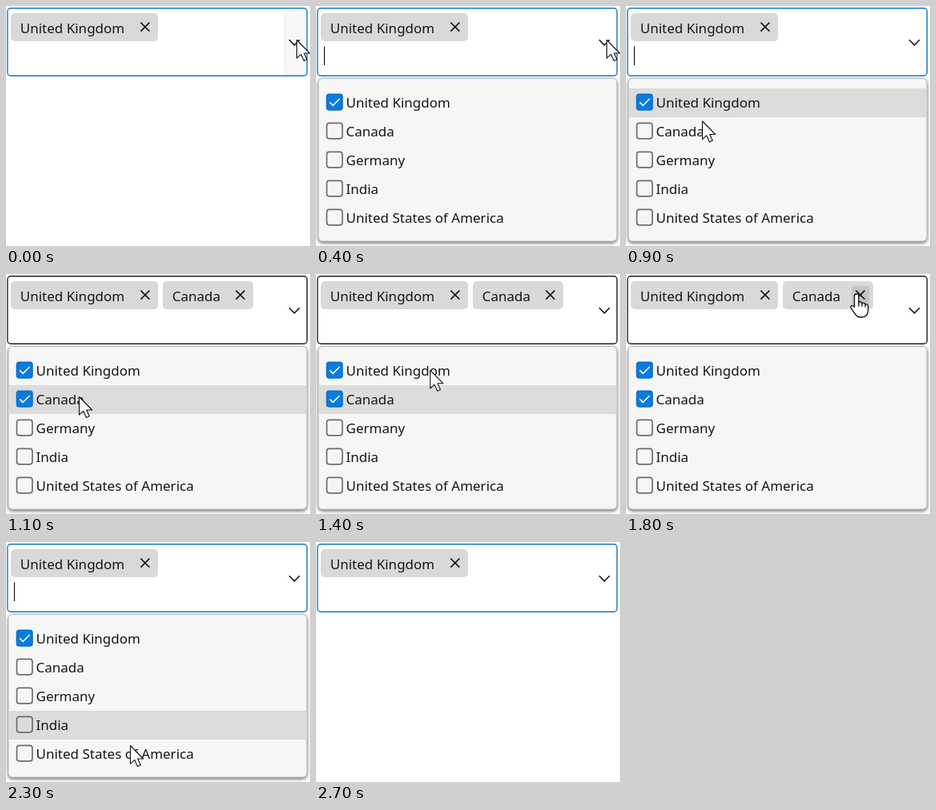
An HTML page that plays this animation: 380 by 300 pixels, repeating every 2800 ms.

```html
<!DOCTYPE html>
<html lang="en">
<head>
<meta charset="utf-8">
<title>Multi-select combo box</title>
<style>
  html, body { margin: 0; width: 100%; height: 100%; overflow: hidden; background: #fff; }
  svg { display: block; width: 380px; height: 300px; }
  text { font: 17px "Noto Sans", "Open Sans", sans-serif; fill: #161616; }
  .line { fill: none; stroke: #161616; stroke-width: 1.6; }
  .pointer { fill: #fff; stroke: #111; stroke-width: 1.1; stroke-linejoin: round; }
</style>
</head>
<body>
<svg id="stage" viewBox="0 0 380 300" xmlns="http://www.w3.org/2000/svg">
  <defs>
    <filter id="shade" x="-5%" y="-5%" width="110%" height="115%">
      <feDropShadow dx="0" dy="1.8" stdDeviation="2.2" flood-color="#000" flood-opacity=".62"/>
    </filter>
  </defs>
  <rect width="380" height="300" fill="#fff"/>
  <g id="popup">
    <rect x="3" y="90.5" width="373" height="203.5" rx="5" fill="#f6f6f6" stroke="#a8a8a8" stroke-width=".8" filter="url(#shade)"/>
    <rect id="rowHover" x="4" width="372" height="36" fill="#dcdcdc"/>
    <g id="rows"></g>
  </g>
  <rect x="2" y="3" width="374" height="84" rx="4" fill="#fff"/>
  <rect id="dropHover" x="347" y="4" width="28" height="82" fill="#f7f7f7"/>
  <rect id="field" x="1.9" y="2.8" width="374.4" height="84.5" rx="4" fill="none" stroke-width="1.4"/>
  <g id="chips"></g>
  <path id="caret" d="M10.5 50.5V74" stroke="#111" stroke-width="1.2"/>
  <path id="chevron" class="line" d="M354 42.3L360.5 48.8L367 42.3"/>
  <path id="arrow" class="pointer" d="M.5 .5V23.2L5.7 18.3L9.4 26.5L13.2 24.8L9.6 17H16.6Z"/>
  <g id="hand">
    <g class="pointer" transform="translate(-.8 0) scale(1.22)">
      <path d="M-2.2 2Q-2.2 0 0 0Q2.2 0 2.2 2V9Q2.4 7.8 4 8Q5.5 8.1 5.6 9.8Q6 8.9 7.4 9.1Q8.8 9.3 8.9 10.8Q9.4 10.2 10.5 10.5Q11.8 11 11.8 12.5V17Q11.8 23.8 4.5 23.8Q.6 23.8 -1.4 20.6L-5.6 14.6Q-6.4 13 -5.2 12Q-4 11.3 -2.2 13.4Z"/>
      <path d="M2.2 9V13M5.6 9.8V13M8.9 10.8V13.5" fill="none"/>
    </g>
  </g>
</svg>
<script>
const LOOP = 2800, STEP = 100, ROW_TOP = 103, ROW_H = 36;
const OPEN = 400, CLOSE = 2700, PICK = 1100, DROP = 1900, LEAVE = 2500;
const countries = ["United Kingdom", "Canada", "Germany", "India", "United States of America"];

// Pointer stops: time, x, y
const path = [
  [0, 363, 42], [400, 363, 42], [800, 99, 134], [1000, 91, 153], [1200, 91, 153],
  [1800, 289, 25], [1900, 289, 25], [2200, 158, 245], [2300, 155, 254], [2400, 358, 41]
];

const $ = id => document.getElementById(id);
const show = (el, on) => el.setAttribute("display", on ? "inline" : "none");

function make(parent, tag, attrs, text = "") {
  const el = document.createElementNS("http://www.w3.org/2000/svg", tag);
  for (const key in attrs) el.setAttribute(key, attrs[key]);
  el.textContent = text;
  return parent.appendChild(el);
}

function addChip(x, width, label) {
  const g = make($("chips"), "g", { transform: `translate(${x} 9)` });
  make(g, "rect", { width, height: 35, rx: 5, fill: "#d9d9d9" });
  const hover = make(g, "rect", { x: width - 27, y: 6, width: 22, height: 23, rx: 2, fill: "#c5c5c5" });
  make(g, "text", { x: 11.8, y: 25 }, label);
  make(g, "path", { class: "line", d: `M${width - 21.6} 11.6l11 11m0 -11l-11 11` });
  return { g, hover };
}

function addRow(label, i) {
  const y = 120 + i * ROW_H;
  const box = make($("rows"), "rect", { x: 13.5, y: y - 9.6, width: 19.4, height: 19.4, rx: 3, "stroke-width": 1.7 });
  const tick = make($("rows"), "path", {
    d: `M17.2 ${y + .4}l4 4l8.4 -8.4`, fill: "none", stroke: "#fff", "stroke-width": 1.5
  });
  make($("rows"), "text", { x: 37.5, y: y + 7 }, label);
  return on => {
    show(tick, on);
    box.setAttribute("fill", on ? "#0a7be0" : "none");
    box.setAttribute("stroke", on ? "#0a70cc" : "#6e6e6e");
  };
}

const first = addChip(6, 184, countries[0]);
const second = addChip(196, 113, countries[1]);
show(first.hover, false);
const setRow = countries.map(addRow);

function pointerAt(t) {
  let i = 0;
  while (i < path.length - 2 && t >= path[i + 1][0]) i++;
  const [t0, x0, y0] = path[i], [t1, x1, y1] = path[i + 1];
  const p = Math.min(1, Math.max(0, (t - t0) / (t1 - t0)));
  const e = p * p * (3 - 2 * p);
  return [x0 + (x1 - x0) * e, y0 + (y1 - y0) * e];
}

function draw(time) {
  const t = Math.floor((time % LOOP) / STEP) * STEP;
  const open = t >= OPEN && t < CLOSE;
  const picked = t >= PICK && t < DROP;
  const [x, y] = pointerAt(t);
  const onCross = picked && x > 282 && x < 304 && y < 40;

  show($("dropHover"), t < OPEN);
  show($("popup"), open);
  show($("caret"), open && !picked && t < LEAVE);
  show(second.g, picked);
  show(second.hover, onCross);
  $("field").setAttribute("stroke", picked ? "#202020" : "#1079c4");
  setRow.forEach((set, i) => set(i === 0 || (i === 1 && picked)));

  // Row highlight trails the pointer by one step
  const row = Math.floor((pointerAt(t - STEP)[1] - ROW_TOP) / ROW_H);
  show($("rowHover"), row >= 0 && row < countries.length && t < LEAVE);
  $("rowHover").setAttribute("y", ROW_TOP + row * ROW_H);

  show($("arrow"), t < LEAVE && !onCross);
  show($("hand"), onCross);
  for (const id of ["arrow", "hand"]) $(id).setAttribute("transform", `translate(${x} ${y})`);
}

const start = performance.now();
function tick() {
  draw(performance.now() - start);
  requestAnimationFrame(tick);
}
tick();
</script>
</body>
</html>
```
